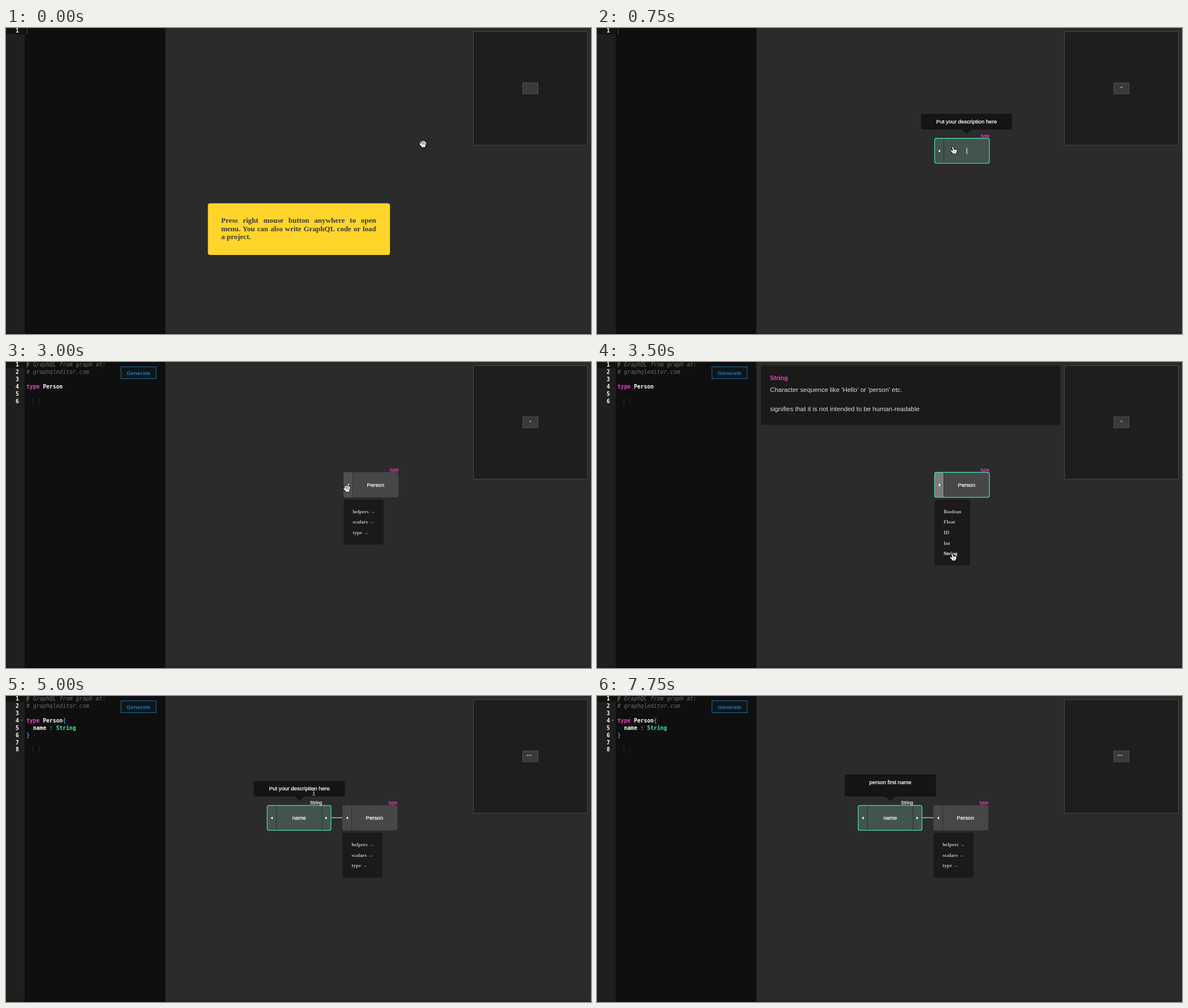
An HTML page for the animation above (8 s loop, 1033x542 px).

```html
<!DOCTYPE html>
<html lang="en">
<head>
<meta charset="utf-8">
<title>Schema graph editor</title>
<style>
html, body { margin: 0; width: 100%; height: 100%; overflow: hidden; background: #2b2b2b; }
svg { display: block; width: 1033px; height: 542px; }
text { font-family: "Liberation Sans", Arial, sans-serif; white-space: pre; }
.menu { font: bold 9.1px "Liberation Serif", Times, serif; fill: #b8b8b8; }
.menu.on { fill: #fff; }
.code { font: 9.7px "DejaVu Sans Mono", monospace; fill: #fff; }
.b { font-weight: bold; }
.note { font-style: italic; fill: #6a6a6a; }
.doc { font-size: 11.4px; fill: #dcdcdc; }
.title { font-size: 11px; font-weight: bold; fill: #f53dba; }
.error { font: 9.27px "Liberation Serif", Times, serif; letter-spacing: .97px; fill: #e21d59; stroke: #e21d59; stroke-width: .2; }
.label { font-size: 9.63px; fill: #fff; stroke: #fff; stroke-width: .25; }
.tag { font-size: 8.15px; }
.hint { font: bold 13px/14.6px "Liberation Serif", Times, serif; color: #3c3a3a; text-align: justify; }
</style>
</head>
<body>
<svg id="stage" viewBox="0 0 1033 542"></svg>
<script>
const stage = document.getElementById('stage');
const pen = document.createElement('canvas').getContext('2d');
pen.font = '9.63px "Liberation Sans", Arial, sans-serif';

const STEP = 250, LOOP = 8000;
const PINK = '#f53dba', GREEN = '#45dca5', BLUE = '#3b9de0';

const rect = (x, y, w, h, fill, r = 0, extra = '') =>
  `<rect x="${x}" y="${y}" width="${w}" height="${h}" rx="${r}" fill="${fill}" ${extra}/>`;
const path = (d, fill, extra = '') => `<path d="${d}" fill="${fill}" ${extra}/>`;
const text = (x, y, s, cls, extra = '') => `<text x="${x}" y="${y}" class="${cls}" ${extra}>${s}</text>`;
const span = (s, fill, cls = 'b') => `<tspan class="${cls}" fill="${fill}">${s}</tspan>`;
const at = (x, y, s) => `<g transform="translate(${x} ${y})">${s}</g>`;
const caret = (x, y) => rect(x, y, 1, 11.5, '#fff');

// Centred label, optionally with a text caret after it
const label = (x, y, s, typing) => text(x, y, s, 'label', 'text-anchor="middle"') +
  (typing ? caret(x + pen.measureText(s).width / 2, y - 9) : '');

function menu(x, y, w, items, on) {
  return rect(x, y, w, 24 + items.length * 18.55, '#1a1a1a', 3) + items.map((s, i) =>
    text(x + 16, y + 24.2 + i * 18.55, s, s === on ? 'menu on' : 'menu')).join('');
}
const TYPES = ['type', 'input', 'union', 'enum', 'scalar', 'interface', 'directive'];
const HELPERS = ['helpers →', 'scalars →', 'type →'];
const SCALARS = ['Boolean', 'Float', 'ID', 'Int', 'String'];

function doc(h, title, lines) {
  return rect(289.5, 6.5, 528.5, h, '#1a1a1a', 3) + text(305.5, 32, title, 'title') +
    lines.map((s, i) => text(305.5, 53 + i * 17, s, 'doc')).join('');
}

function node(x, y, o) {
  const w = o.right ? 113 : 97, edge = '#2d2d2d';
  const fill = o.selected ? '#435450' : '#474747';
  let s = rect(0, 0, w, 44.5, fill, 3);
  if (o.port) s += path('M3 0H16.5V44.5H3Q0 44.5 0 41.5V3Q0 0 3 0Z', o.port);
  s += rect(16, 0, 1, 44.5, edge) + path('M10 20V25L6.5 22.5Z', '#fff');
  if (o.right) s += rect(96.5, 0, 1, 44.5, edge) + path('M103 20V25L106.5 22.5Z', '#fff');
  if (o.selected || o.outline)
    s += rect(.2, .2, w - .4, 44.1, 'none', 3, `stroke="${GREEN}" stroke-width="1.3"`);
  s += label(56.5, 25.8, o.name, o.typing);
  s += text(97, -1.4, o.tag, 'tag', `text-anchor="end" fill="${o.tagFill}" stroke="${o.tagFill}" stroke-width=".2"`);
  return at(x, y, s);
}

function bubble(x, y, lines, typing) {
  const grow = (lines.length - 1) * 11.3, last = lines.length - 1;
  return at(x, y, rect(-80.5, -43.2 - grow, 161, 27.7 + grow, '#151515', 2) +
    path('M-8.5 -16H8.5L0 -7.5Z', '#151515') +
    lines.map((s, i) => label(0, -26.3 - grow + i * 11.3, s, typing && i === last)).join(''));
}

const errorBox = rect(568, 6.5, 241.5, 43.5, '#1a1a1a', 2) +
  text(584, 31.8, 'Syntax Error: Expected Name, found &lt;EOF&gt;', 'error');

const hint = rect(356.5, 310.5, 321.5, 91.5, '#ffd52b', 4) +
  '<foreignObject x="380" y="334" width="273.5" height="50"><div class="hint">Press right mouse button anywhere to open menu. You can also write GraphQL code or load a project.</div></foreignObject>';

const frameParts = rect(0, 0, 33, 542, '#1f1f1f') + rect(33, 0, 248.5, 542, '#0f0f0f') +
  rect(0, 0, 33, 11, '#141414') + rect(36, 0, 2, 11, '#37331d') +
  rect(825.5, 6.5, 201, 201, '#1e1e1e', 0, 'stroke="#454545"') +
  rect(912.5, 97, 27, 19.5, '#3a3a3a', 0, 'stroke="#4e4e4e"');

function editor(stage) {
  const notes = [span('# GraphQL from graph at:', '', 'note'), span('# graphqleditor.com', '', 'note'), ''];
  const kind = span('type ', PINK), name = span('Person', '#fff');
  const code = [
    [''],
    [...notes, kind + name, '', ''],
    [...notes, kind + name + span('{', BLUE),
      span('  name ', '#fff') + span(': ', BLUE) + span('String', '#3ee8a0'), span('}', BLUE), '', '']
  ][stage];
  let s = code.map((line, i) => {
    const y = 8.4 + i * 12.87;
    return text(22.8, y, i + 1, 'code b', 'text-anchor="end"') + text(36, y, line, 'code');
  }).join('');
  if (!stage) return s;
  const y = (code.length - 1) * 12.87 - .3;
  s += rect(47, y, 1, 11, '#2b2b2b') + rect(58, y, 1, 11, '#2b2b2b');
  if (stage === 2) s += path('M25.5 42H30L27.7 44.8Z', '#666');
  return s + rect(203, 8.5, 62, 21, '#10161a', 0, 'stroke="#1d6f9f"') +
    text(213, 22.8, 'Generate', 'code', 'style="font:bold 9.7px Liberation Sans,Arial,sans-serif;fill:#1f77ab"');
}

// Pointers: dark outline below, white strokes above
const inked = d => path(d, '#111', 'stroke="#111" stroke-width="4" stroke-linecap="round" stroke-linejoin="round"') +
  path(d, '#fff', 'stroke="#fff" stroke-width="1.9" stroke-linecap="round" stroke-linejoin="round"');
const cursors = {
  grab: inked('M-2 4L-5 0M-2 1L-3.2 -3.5M0 0V-4.7M2.2 0L2.8 -4M4 1L5 -2M-2 1H4L3 5H-1Z') +
    path('M-1 2V-2M1.2 2V-2M3 2V-1', 'none', 'stroke="#333" stroke-width=".6"'),
  point: inked('M0 2L-2 -4.5M-2 4L-4.5 1M0 1L4.5 .5L4 3.5L3 5.5H-1L-2 3Z') +
    path('M.5 2V5M2.2 2V5', 'none', 'stroke="#333" stroke-width=".6"'),
  beam: path('M-2.5 -6Q0 -6 0 -4.5Q0 -6 2.5 -6M0 -4.5V4.5M-2.5 6Q0 6 0 4.5Q0 6 2.5 6M-1.5 2H1.5',
    'none', 'stroke="#bbb" stroke-width="1"')
};
// [first step, last step, shape, x, y]
const moves = [
  [0, 0, 'grab', 736, 205], [1, 1, 'grab', 614, 201], [2, 3, 'point', 630, 216],
  [9, 9, 'grab', 640, 259], [10, 10, 'grab', 612, 240], [11, 12, 'grab', 602, 224],
  [13, 13, 'point', 626, 287], [14, 15, 'point', 629, 345],
  [19, 19, 'beam', 556, 178], [20, 21, 'beam', 543.5, 170]
];

function draw(k) {
  const typed = (word, from, rate) => word.slice(0, Math.max(0, Math.round((k - from) * rate)));
  let s = frameParts + editor(k < 9 ? 0 : k < 18 ? 1 : 2);
  const linked = k >= 15;

  if (k < 3) s += hint;
  if (k >= 3) {
    const x = linked ? 594 : 596, y = linked ? 193.6 : 195.3;
    const naming = k < 10, picking = k === 13 || k === 14;
    s += rect(924.5, 104.5, 3, 1.3, '#ddd');
    if (linked) {
      const editing = k >= 16 && k < 19;
      s += rect(919.8, 104.5, 3, 1.3, '#ddd') + rect(574, 214.8, 20, 1.5, '#62d9c2');
      s += node(461, y, { name: typed('name', 15, 1.5), typing: editing, selected: true, right: true, tag: 'String', tagFill: '#fff' });
      const lines = k < 22 ? ['Put your description here'] : [typed('person first name', 21, 2.45)];
      if (k >= 29) lines.push('');
      s += bubble(518, y, lines, k > 20 && k < 31);
    }
    s += node(x, y, {
      name: naming ? typed('Person', 4, 5 / 3) : 'Person', typing: naming, selected: naming,
      outline: picking, port: picking ? '#7c7c7c' : k === 11 || k === 12 ? '#505050' : '',
      tag: 'type', tagFill: PINK
    });
    if (naming) s += bubble(652.5, y, ['Put your description here']);
    if (k === 14) s += menu(596, 243.7, 63, SCALARS, 'String');
    else if (k >= 11) s += menu(x + .3, y + 48.4, 70.5, HELPERS, k === 13 ? HELPERS[1] : '');
  }

  if (k === 1 || k === 2) s += menu(610, 195.5, 66, TYPES, k === 2 ? 'type' : '');
  if (k === 2) s += doc(71.5, 'type', [
    'The most basic components of a GraphQL schema are object types, which just represent a kind',
    'of object you can fetch from your service, and what fields it has.']);
  if (k === 14) s += doc(105, 'String', [
    "Character sequence like 'Hello' or 'person' etc.", '',
    'signifies that it is not intended to be human-readable']);
  if ((k >= 4 && k < 9) || (k >= 15 && k < 18)) s += errorBox;

  s += rect(0, 538, 1033, 4, '#000', 0, 'opacity=".12"');
  const move = moves.find(m => k >= m[0] && k <= m[1]);
  if (move) s += at(move[3], move[4], cursors[move[2]]);
  stage.innerHTML = s;
}

let shown = -1;
function tick() {
  const k = Math.floor(performance.now() % LOOP / STEP);
  if (k !== shown) draw(shown = k);
  requestAnimationFrame(tick);
}
tick();
</script>
</body>
</html>
```
